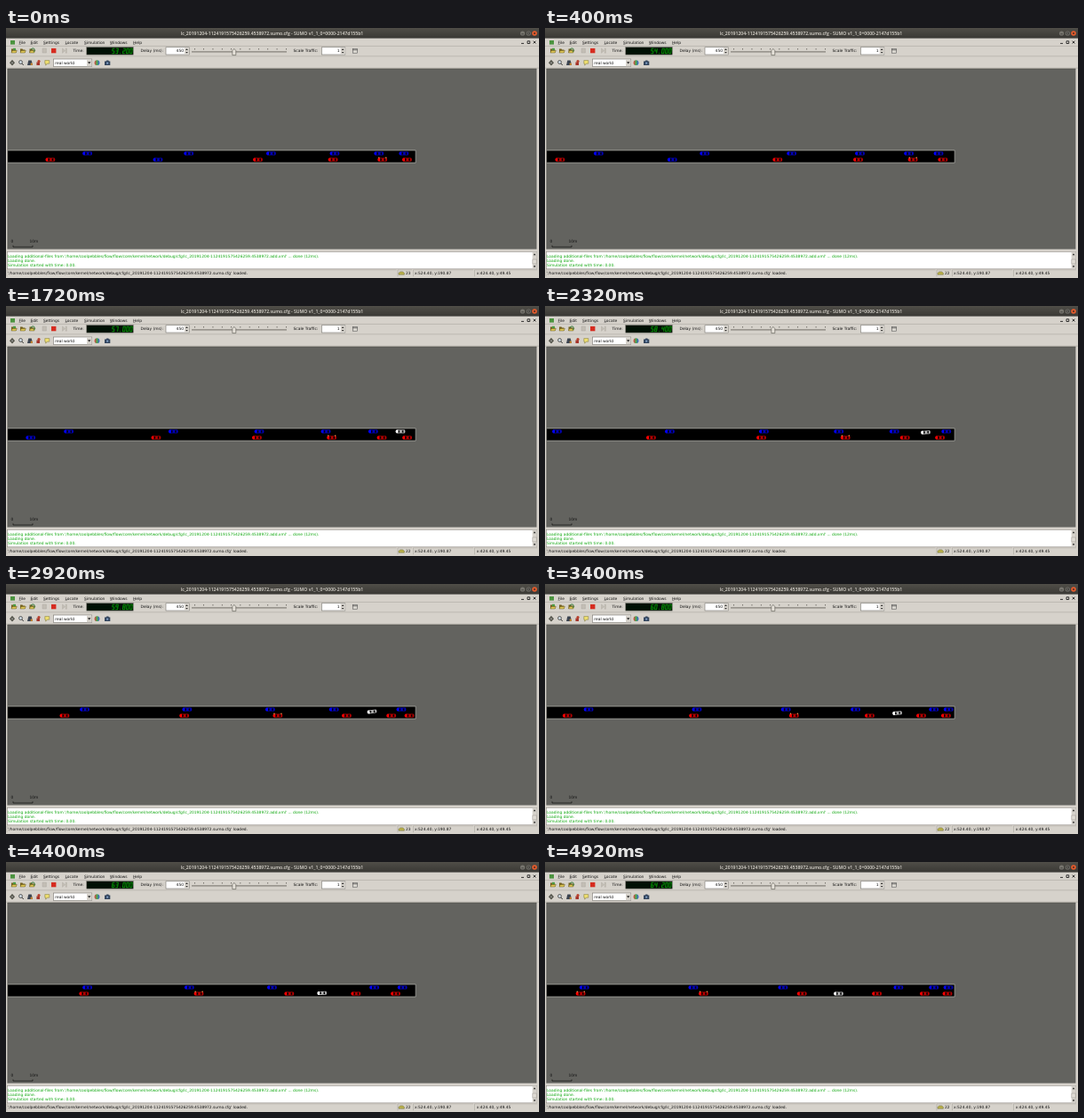
Animation, 600 px wide and 282 px high, one loop 5 s. Source, as an HTML page:

```html
<!DOCTYPE html>
<html lang="en">
<head>
<meta charset="utf-8">
<title>Traffic simulation</title>
<style>
  html, body { margin: 0; width: 100%; height: 100%; overflow: hidden; background: #d6d2cb; }
  svg { display: block; width: 600px; height: 282px; }
  text { font: 4.4px "DejaVu Sans", sans-serif; fill: #111; white-space: pre; }
  .title { font: 600 5.1px "Open Sans", sans-serif; fill: #dedad2; text-anchor: middle; }
  .log { fill: #10a810; }
  .end { text-anchor: end; }
  .field { fill: #fff; stroke: #77746e; stroke-width: .6; }
  .pale { fill: #c3beb5; stroke: #aaa59c; stroke-width: .4; }
  .line { fill: none; stroke: #222; stroke-width: .6; }
  .bold { stroke-width: .9; }
  .rule { fill: none; stroke: #aaa69e; stroke-width: .6; }
  .lcd { fill: none; stroke: #00c400; stroke-width: .65; stroke-linecap: round; }
</style>
</head>
<body>
<svg viewBox="0 0 600 282">
  <defs>
    <linearGradient id="bar" x2="0" y2="1">
      <stop offset="0" stop-color="#504e48"/><stop offset="1" stop-color="#393834"/>
    </linearGradient>
    <linearGradient id="hues">
      <stop offset="0" stop-color="#e04040"/><stop offset=".5" stop-color="#48a850"/><stop offset="1" stop-color="#3858e0"/>
    </linearGradient>
    <g id="car">
      <path d="M-2.2-2H-4.2Q-5.4-1.7-5.4 0T-4.2 2H-2.2Z"/>
      <path d="M-2.2-2H4.6Q5.4-1.6 5.4 0T4.6 2H-2.2Z" opacity=".7"/>
      <path d="M-2.4-1.4L-.8-1V1L-2.4 1.4ZM1.8-1L3.4-1.4V1.4L1.8 1Z" fill="#000"/>
    </g>
    <g id="lamps">
      <circle cx="-3.9" cy="-2.2" r=".75"/><circle cx="4.1" cy="-2.2" r=".75"/>
    </g>
    <g id="folder">
      <path d="M-3-2H-.5L.2-1.2H2.4V2.4H-3Z" fill="#74601f"/>
      <path d="M-2-.2H3.4L2.2 2.4H-3Z" fill="#dcc455" stroke="#55481c" stroke-width=".4"/>
    </g>
    <path id="arrows" d="M-1.3-1L0-2.6L1.3-1ZM-1.3 1L0 2.6L1.3 1Z" fill="#222"/>
  </defs>

  <!-- title bar and menu -->
  <rect width="600" height="282" fill="#d6d2cb"/>
  <rect width="600" height="11.6" fill="url(#bar)"/>
  <text class="title" x="299.5" y="8">lc_20191204-1124191575426259.4538972.sumo.cfg - SUMO v1_1_0+0000-2147d155b1</text>
  <g fill="#77756e"><circle cx="581.5" cy="6" r="2.6"/><circle cx="588.3" cy="6" r="2.6"/></g>
  <circle cx="595" cy="6" r="2.8" fill="#e45b2c"/>
  <path class="line" d="M580.3 6.8h2.4M587.1 4.9h2.4v2.2h-2.4ZM594 5l2 2m0-2l-2 2"/>
  <rect x="5" y="14" width="5" height="4.6" fill="#4c9440"/>
  <g id="menu"></g>
  <path class="line bold" d="M580 17.4h3M587 14.8h2.7v2.7H587ZM593.6 14.7l2.8 2.8m0-2.8l-2.8 2.8"/>
  <path class="rule" d="M0 20.4H600M0 31.8H600M0 45.2H600"/>

  <!-- simulation controls -->
  <g transform="translate(0 -.4)">
    <use href="#folder" x="9" y="26"/><use href="#folder" x="19" y="26"/><use href="#folder" x="29.5" y="26"/>
    <path d="M8 23.2h3v2.2H8Z" fill="#4c9b43"/>
    <path d="M28.3 25.2a2 2 0 1 1 2.5 2" fill="none" stroke="#357b38"/>
    <path class="pale" d="M41 23.4h4.4v5H41ZM63.5 23.4L66.5 26L63.5 28.6ZM67.3 23.4h1v5.2h-1Z"/>
    <rect x="51" y="23.3" width="5.4" height="5.4" fill="#d62c20"/>
    <text x="75.5" y="27.5">Time:</text>
    <rect x="90.8" y="22.1" width="52.4" height="8.4" fill="#001004" stroke="#66645e" stroke-width=".5"/>
    <path class="lcd" id="lcd"/>
    <text x="151.5" y="27.5">Delay (ms):</text>
    <rect class="field" x="180" y="22.2" width="26.2" height="8.2"/>
    <rect x="201" y="22.6" width="5" height="7.4" fill="#d6d2cb"/><use href="#arrows" x="203.5" y="26.3"/>
    <text class="end" x="200" y="27.8">450</text>
    <path d="M212 24.2H316" stroke="#55524c" stroke-width="1.6" stroke-dasharray=".7 9.6"/>
    <path d="M209 27.3H316" stroke="#85817a" stroke-width="1.1"/>
    <path d="M254.8 31V26l2-2.2l2 2.2V31Z" fill="#e4e0d8" stroke="#55524c" stroke-width=".6"/>
    <text x="323.5" y="27.5">Scale Traffic:</text>
    <rect class="field" x="355.3" y="22.2" width="26.5" height="8.2"/>
    <rect x="376.6" y="22.6" width="5" height="7.4" fill="#d6d2cb"/><use href="#arrows" x="379.1" y="26.3"/>
    <text class="end" x="375.5" y="27.8">1</text>
    <rect x="390.3" y="23.8" width="5.2" height="4.8" fill="#dedbd4" stroke="#555" stroke-width=".6"/>
    <path class="line" d="M390.3 25.2h5.2"/>
  </g>

  <!-- view controls -->
  <path d="M7 35.8L10 39.2L7 42.6L4 39.2Z" fill="#55554c"/><circle cx="7" cy="39.2" r=".8" fill="#bbb"/>
  <circle cx="16.5" cy="38.5" r="1.9" fill="#d7e2ea" stroke="#333" stroke-width=".8"/><path class="line bold" d="M17.8 40l2 2"/>
  <path d="M25.3 36.5h3.4L30 42h-6Z" fill="#3c4450"/><circle cx="28.8" cy="40.8" r="1.2" fill="#d08c30"/>
  <path d="M34.4 38.5h3.6v3.5h-3.6Z" fill="#a5352c"/><circle cx="37" cy="37.6" r="1.6" fill="#b8402c"/>
  <path d="M43.8 36.6h5v3.6h-2.6l-1.5 2v-2h-.9Z" fill="#f0e070" stroke="#77703a" stroke-width=".5"/>
  <rect class="field" x="53.5" y="35" width="43.2" height="8.6"/>
  <rect x="91" y="35.4" width="5.4" height="7.8" fill="#d6d2cb"/>
  <path d="M92 38.2h3.4l-1.7 2.4Z" fill="#222"/>
  <text x="55.3" y="40.8">real world</text>
  <circle cx="102.5" cy="39.2" r="2.9" fill="url(#hues)"/>
  <path d="M111 37.6h1.6l.7-1h2l.7 1h1.3v4.3H111Z" fill="#34465e"/><circle cx="114.2" cy="39.7" r="1.1" fill="#7fa0c8"/>

  <!-- view -->
  <rect x="2" y="46" width="595.4" height="203.5" fill="#63635f"/>
  <path d="M1.7 249.5V46H597.4" fill="none" stroke="#4a4945" stroke-width=".6"/>
  <rect x="2" y="138" width="459.3" height="14" fill="#000"/>
  <path d="M2 138H461.2V152H2" fill="none" stroke="#b9b9b4" stroke-width=".7"/>
  <svg width="461.5" height="282"><g id="cars"></g></svg>
  <path class="line" d="M8 245.3V247H30V245.3" style="stroke:#000"/>
  <text x="5.5" y="242.4">0</text><text x="26.5" y="242.4">10m</text>

  <!-- messages and status -->
  <rect x="1.7" y="252.5" width="595.7" height="19.3" fill="#fff" stroke="#8a867e" stroke-width=".5"/>
  <rect x="592.6" y="252.8" width="4.8" height="18.7" fill="#d6d2cb"/>
  <rect x="592.9" y="261" width="4.2" height="5" fill="#e0dcd5" stroke="#8a867e" stroke-width=".4"/>
  <path d="M593.7 256.2l1.3-2l1.3 2ZM593.7 268.2l1.3 2l1.3-2Z" fill="#222"/>
  <text class="log" x="2" y="258.6">Loading additional-files from '/home/coolpebbles/flow/flow/core/kernel/network/debug/cfg/lc_20191204-1124191575426259.4538972.add.xml' ... done (12ms).</text>
  <text class="log" x="2" y="263.9">Loading done.</text>
  <text class="log" x="2" y="269.3">Simulation started with time: 0.00.</text>
  <path class="rule" d="M1 280.3V272.8H439.5M441 280.3V272.8H457M458.5 280.3V272.8H526M527.5 280.3V272.8H598"/>
  <text x="2" y="277.5">'/home/coolpebbles/flow/flow/core/kernel/network/debug/cfg/lc_20191204-1124191575426259.4538972.sumo.cfg' loaded.</text>
  <path d="M442 278.2v-1.7l1.6-1.6h3.2l1.6 1.6v1.7Z" fill="#b9b04c" stroke="#5a5830" stroke-width=".4"/>
  <text id="count" x="450" y="277.6"></text>
  <text x="460" y="277.6">x:524.40, y:190.87</text>
  <text x="529.8" y="277.6">x:424.40, y:49.45</text>
</svg>

<script>
const $ = id => document.getElementById(id);
const add = (parent, tag, attrs) => {
  const el = document.createElementNS('http://www.w3.org/2000/svg', tag);
  for (const k in attrs) el.setAttribute(k, attrs[k]);
  return parent.appendChild(el);
};

const menu = { File: 14.5, Edit: 27.5, Settings: 42, Locate: 66.5, Simulation: 88, Windows: 117, Help: 143 };
for (const [name, x] of Object.entries(menu)) {
  add($('menu'), 'text', { x, y: 17.8 }).textContent = name;
  add($('menu'), 'rect', { x, y: 18.5, width: 2.4, height: .35, fill: '#222' });
}

// Cars start at rest on the right and accelerate steadily; times are in steps of 0.2 s.
const TOP = 141.6, LOW = 148.5, BLUE = '#0000ff', RED = '#ff0000';
const START = 454.7, GAIN = .0404, DELAY = 3;
const cars = [];
function addCar(enter, y, fill, lampsFrom = Infinity) {
  const el = add($('cars'), 'g', { fill });
  add(el, 'use', { href: '#car' });
  const lamps = add(el, 'use', { href: '#lamps', fill: '#ff9a50' });
  cars.push({ enter, y, el, lamps, lampsFrom });
}
[-94.8, -78.5, -62.2, -45.8, -29.4, -13, 17.5, 34.5, 51].forEach(n => addCar(n, TOP, BLUE));
addCar(-83.8, LOW, BLUE);
[-100.1, -65.1, 10.2, 29, 48.5, -9].forEach(n => addCar(n, LOW, RED));
addCar(-46.3, LOW, RED, 50);
addCar(-27.7, LOW, RED, 0);

// The white car changes lane: step, x, y, angle.
const white = add($('cars'), 'use', { href: '#car', fill: '#fff' });
const route = [
  [5, 455, TOP, 0], [10, 454.5, TOP, 0], [19, 444, TOP, 0], [26, 428.5, 142.5, -4],
  [33, 412, 144, -8], [43, 381, 147.2, -3], [55, 330.4, LOW, 0]
];
function along(step) {
  let i = 1;
  while (i < route.length - 1 && route[i][0] < step) i++;
  const a = route[i - 1], b = route[i], k = (step - a[0]) / (b[0] - a[0]);
  return a.map((v, j) => v + (b[j] - v) * k);
}

// Slanted seven-segment digits.
const segs = { a: 'M1 0h1.8', b: 'M3 .3l-.3 2.2', c: 'M2.6 3l-.3 2.2', d: 'M.3 5.5h1.8', e: 'M.4 3l-.3 2.2', f: 'M.8 .3l-.3 2.2', g: 'M.7 2.75h1.7' };
const digits = ['abcdef', 'bc', 'abged', 'abgcd', 'fgbc', 'afgcd', 'afgedc', 'abc', 'abcdefg', 'abcdfg'];
const shift = (d, x, y) => d.replace(/M([\d.]+) ([\d.]+)/, (_, a, b) => `M${+a + x} ${+b + y}`);
const lcdPath = s => [...s].map((c, i) => {
  const x = 119.3 + i * 4, y = 23.6;
  return c === '.' ? `M${x + 1.3} ${y + 5.5}h.1` : [...digits[c]].map(k => shift(segs[k], x, y)).join('');
}).join('');

function draw(step) {
  for (const c of cars) {
    const n = step - c.enter, x = START - GAIN * n * n;
    c.el.style.display = n >= DELAY && x > -6 ? '' : 'none';
    c.el.setAttribute('transform', `translate(${x} ${c.y})`);
    c.lamps.style.display = step >= c.lampsFrom ? '' : 'none';
  }
  const [, x, y, turn] = along(step);
  white.style.display = step >= route[0][0] ? '' : 'none';
  white.setAttribute('transform', `translate(${x} ${y}) rotate(${turn})`);
  $('lcd').setAttribute('d', lcdPath((53.2 + step * .2).toFixed(3)));
  $('count').textContent = step % 33 < 4 ? 23 : 22;
}

// Three pictures every 200 ms, lasting 80, 40 and 80 ms.
const start = performance.now();
let shown = -1;
function tick() {
  const t = (performance.now() - start) % 5000, r = t % 200;
  const pic = 3 * Math.floor(t / 200) + (r >= 80) + (r >= 120);
  const step = Math.round(pic * 55 / 74);
  if (step !== shown) draw(shown = step);
  requestAnimationFrame(tick);
}
tick();
</script>
</body>
</html>
```
